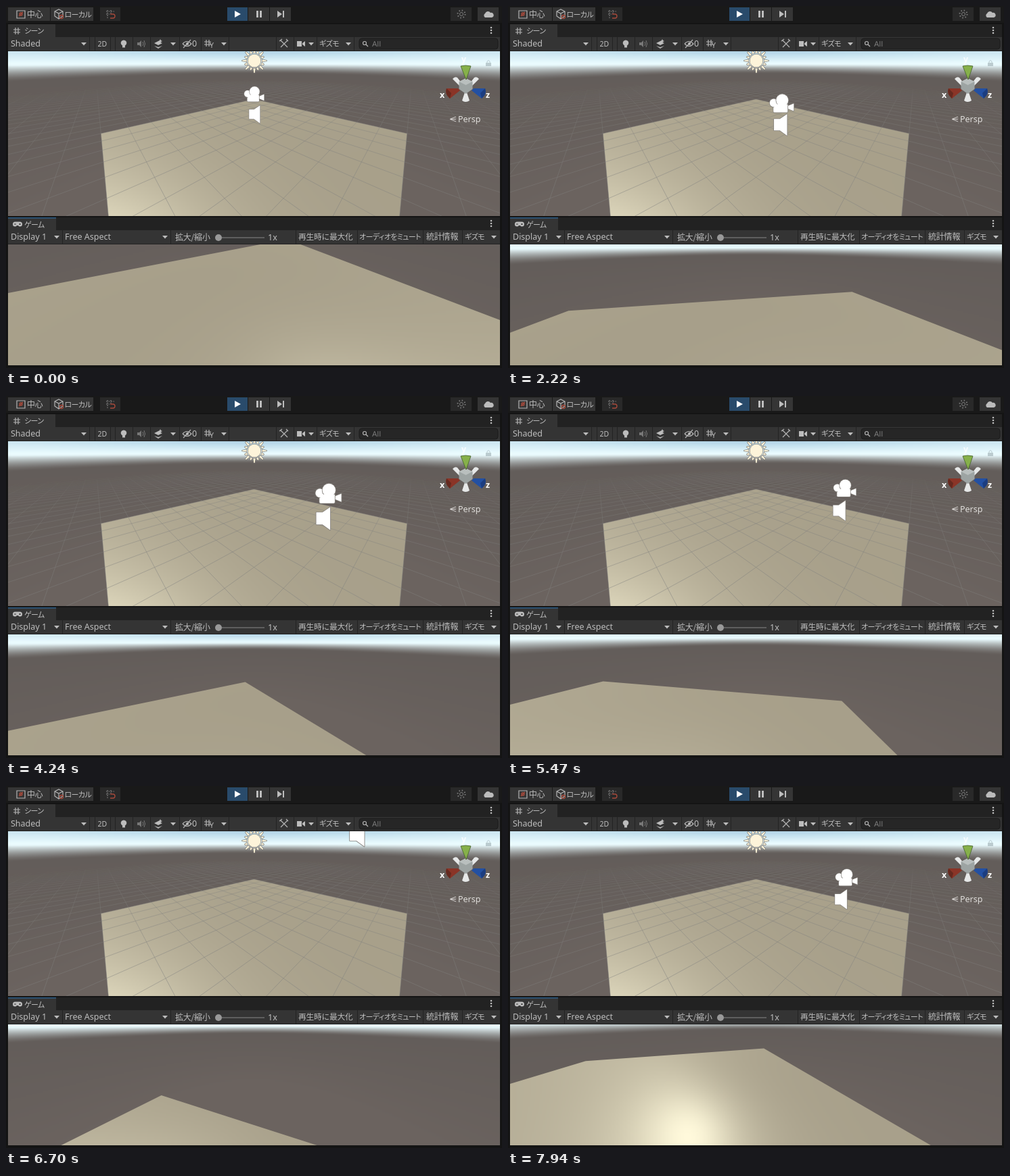
Recreate the animation shown at these times as an HTML page with a canvas. Size 733x536 px, loop 8 s.

```html
<!DOCTYPE html>
<html lang="ja">
<head>
<meta charset="utf-8">
<title>Editor view</title>
<style>
html, body { margin: 0; width: 100%; height: 100%; overflow: hidden; background: #141414; }
canvas, svg { position: absolute; left: 0; top: 0; }
canvas { left: 3px; }
#scene { top: 67px; }
#game { top: 353px; }
text { font: 12.5px "Noto Sans", "Noto Sans CJK JP", sans-serif; fill: #bdbdbd; }
.kanji { font: 12px "Noto Sans CJK JP", "Noto Sans CJK", sans-serif; letter-spacing: -.2px; }
.kana { font: 11px "Noto Sans CJK JP", "Noto Sans CJK", sans-serif; font-feature-settings: "palt"; letter-spacing: -.6px; }
.axis { font-weight: bold; fill: #fff; }
.line { fill: none; stroke: #b4b4b4; stroke-width: 1.2; }
.solid { fill: #bdbdbd; }
.icon { fill: #fff; stroke: #85817c; stroke-width: 1.6; paint-order: stroke; stroke-linejoin: round; }
.sun { fill: #fdf4da; stroke: #77746e; stroke-width: 1.2; paint-order: stroke; }
</style>
</head>
<body>
<canvas id="scene" width="727" height="244"></canvas>
<canvas id="game" width="727" height="179"></canvas>
<svg width="733" height="536" viewBox="0 0 733 536">
  <defs>
    <path id="down" class="solid" d="M-4-2h8l-4 4.5z"/>
    <g id="dots" class="solid"><circle cy="-4" r="1.3"/><circle r="1.3"/><circle cy="4" r="1.3"/></g>
    <path id="hash" class="line" d="M-2-5v10M2-5v10M-5-2h10M-5 2h10"/>
    <clipPath id="sceneClip"><path d="M3 67h727v244H3z"/></clipPath>
  </defs>

  <!-- Main toolbar -->
  <path fill="#191919" d="M0 0h733v25H0z"/>
  <path fill="#353535" d="M3 2h62v20H3zM66 2h63v20H66zM358 2h31v20h-31zM390 2h31v20h-31zM697 2h31v20h-31z"/>
  <path fill="#292929" d="M139 2h30v20h-30zM657 2h31v20h-31z"/>
  <path fill="#294b6b" d="M327 2h30v20h-30z"/>
  <path fill="#fff" d="M338 7v10l9-5z"/>
  <path class="solid" d="M370 7h3v10h-3zM375 7h3v10h-3zM401 7v10l7-5zM409 7h2v10h-2z"/>
  <path class="line" d="M16 7h12v11H16zM72 8l6-3 6 3v7l-6 4-6-4zl6 3 6-3M78 11v8"/>
  <g fill="none" stroke="#a84a3b" stroke-width="1.3">
    <path d="M19 15l6-6"/><circle cx="22" cy="12" r="2"/><circle cx="82" cy="16" r="2.5"/>
    <path d="M154 12h4a3 3 0 0 1 0 6h-4"/>
  </g>
  <path class="line" stroke-dasharray="2 1.5" opacity=".6" d="M148 8h12M148 12h5M150 6v12M155 6v5"/>
  <g fill="none" stroke="#7c7c7c"><circle cx="673" cy="12" r="2.5"/><circle cx="673" cy="12" r="5.5" stroke-width="2" stroke-dasharray="1.5 2.82"/></g>
  <path class="solid" d="M708 17a3.5 3.5 0 0 1 0-6a4.5 4.5 0 0 1 8-1a3.6 3.6 0 0 1 2 7z"/>
  <text class="kanji" x="31" y="16.5">中心</text>
  <text class="kana" x="86.5" y="16.5">ローカル</text>

  <!-- Scene panel header -->
  <path fill="#222" d="M3 27h727v19H3z"/>
  <path fill="#343434" d="M3 27h70v19H3zM3 46h727v21H3z"/>
  <use href="#hash" x="16" y="37"/>
  <text class="kana" x="27" y="41">シーン</text>
  <use href="#dots" x="717" y="36"/>
  <path stroke="#232323" d="M123.5 46v20M131.5 46v20M154.5 46v20M161.5 46v20M187.5 46v20M213.5 46v20M256.5 46v20M288.5 46v20M329.5 46v20M399.5 46v20M425.5 46v20M459.5 46v20M514.5 46v20M3 66.5h727"/>
  <text x="7" y="60">Shaded</text>
  <use href="#down" x="115" y="56"/><use href="#down" x="247" y="56"/><use href="#down" x="322" y="56"/>
  <use href="#down" x="451" y="56"/><use href="#down" x="506" y="56"/>
  <text x="135.5" y="60" style="font-size:10.5px">2D</text>
  <path class="solid" d="M172 58.500a4.300 4.300 0 1 1 4 0v3h-4z"/>
  <path fill="#777" d="M194 54h3l3-3v10l-3-3h-3z"/><path fill="none" stroke="#777" d="M202 53q2 3 0 6M204 51q3 5 0 10"/>
  <path class="solid" d="M219 55l6-3 6 3-6 3zM219 59l6 2 6-2-6 4zM228 49l1 2 2 1-2 1-1 2-1-2-2-1 2-1z"/>
  <path class="line" d="M261 56q6-7 13 0q-6 7-13 0M262 62l11-12"/><circle class="solid" cx="268" cy="56" r="2"/>
  <text x="275" y="60">0</text>
  <use href="#hash" x="298" y="55"/><text x="301" y="62" style="font-size:10.5px">Y</text>
  <path class="line" stroke-width="2.2" d="M406 51l10 10M416 51l-10 10M404 52l4-3M414 49l3 3"/>
  <path class="solid" d="M430 52h7v8h-7zM438 55l4-3v8l-4-3z"/>
  <text class="kana" x="463" y="60">ギズモ</text>
  <rect x="522" y="48" width="205" height="16" rx="4" fill="#262626" stroke="#1b1b1b"/>
  <circle class="line" cx="530" cy="55" r="2.5"/><path class="line" d="M532 57l3 3"/>
  <text x="541" y="60" style="font-size:11.5px;fill:#777">All</text>

  <!-- Game panel header -->
  <path fill="#222" d="M3 313h727v19H3z"/>
  <path fill="#343434" d="M3 313h71v19H3zM3 332h727v21H3z"/>
  <path fill="#2c5d87" d="M3 313h71v1.5H3z"/>
  <path class="solid" fill-rule="evenodd" d="M13.500 319.500h7a3.500 3.500 0 0 1 0 7q-1.500 0-2.500-1.500h-2q-1 1.500-2.500 1.500a3.500 3.500 0 0 1 0-7zM12 322.500h3v1h-3zM19.500 322h2v2h-2z"/>
  <text class="kana" x="27" y="327.5">ゲーム</text>
  <use href="#dots" x="717" y="322"/>
  <path stroke="#232323" d="M83.5 332v20M243.5 332v20M428.5 332v20M519.5 332v20M616.5 332v20M674.5 332v20M3 352.5h727"/>
  <text x="7" y="346">Display 1</text><use href="#down" x="75" y="342"/>
  <text x="87" y="346">Free Aspect</text><use href="#down" x="235" y="342"/>
  <text class="kanji" x="250" y="346.5">拡大/縮小</text>
  <path stroke="#5e5e5e" stroke-width="2" d="M319 343h63"/><circle cx="314" cy="343" r="5" fill="#999"/>
  <text x="387" y="347">1x</text>
  <text class="kanji" x="432" y="346" style="font-size:11.7px">再生時に最大化</text>
  <text class="kana" x="522" y="346">オーディオをミュート</text>
  <text class="kanji" x="621" y="346">統計情報</text>
  <text class="kana" x="678" y="346">ギズモ</text><use href="#down" x="721" y="342"/>

  <!-- Scene icons -->
  <g clip-path="url(#sceneClip)">
    <g class="sun" transform="translate(367 81)"><g id="rays"></g><circle r="9.5"/></g>
    <g id="speaker" class="icon"><path d="M-9-8.500h9L11-16V17L0 9h-9z"/></g>
    <g id="camera" class="icon">
      <path d="M8 4l10-4v11L8 7z"/><rect x="-12" y="0" width="21" height="13" rx="1.5"/>
      <circle cx="-11.5" cy="-1" r="6"/><circle cx="1" cy="-5" r="9"/>
      <path stroke="none" d="M-11 1h19v11h-19z"/>
    </g>
  </g>

  <!-- Orientation gizmo -->
  <path fill="#e6e8e8" d="M660 108q3-4 7-2l7 9-4 3zM699 108q-3-4-7-2l-7 9 4 3zM674 140q5 4 11 0l-4-12h-3z"/>
  <path fill="#8a3427" d="M651 122q-3 8 5 15l15-12-3-3z"/><path fill="#65291f" d="M651 122q-3 8 5 15l2-8z"/>
  <path fill="#2350a2" d="M708 122q3 8-5 15l-15-12 3-3z"/><path fill="#1b3d80" d="M708 122q3 8-5 15l-2-8z"/>
  <path fill="#9da4a3" d="M679.500 107l10 5v11l-10 7-10-7v-11z"/><path fill="#b9bfbe" d="M679.500 107l10 5-10 5-10-5z"/>
  <path fill="#86b04a" stroke="#45602c" stroke-width=".8" d="M672 89q7-2 15 0l-7 20z"/>
  <text class="axis" x="673" y="83" opacity=".8">y</text><text class="axis" x="641" y="136">x</text><text class="axis" x="709" y="136">z</text>
  <g opacity=".5"><path fill="#8fa0a5" d="M709 84h8v5h-8z"/><path fill="none" stroke="#8fa0a5" d="M711 84v-2q2-3 4 0v2"/></g>
  <path fill="none" stroke="#d5d2d0" d="M665 164l-9 3.500 9 3.500M656 167.500h9"/>
  <text x="668" y="172" style="fill:#e0dedc">Persp</text>
</svg>
<script>
const $ = id => document.getElementById(id);
const RAD = Math.PI / 180, LOOP = 8000, HALF = 5, EYE = 1.78, SPEAKER_HEIGHT = 0.94;
const clamp = v => Math.max(0, Math.min(1, v));
const lerp = (a, b, k) => a + (b - a) * k;
const mix = (a, b, k) => a.map((v, i) => lerp(v, b[i], k));
const ramp = (t, from, to) => clamp((t - from) / (to - from));

const GROUND_FAR = [98, 92, 89], GROUND_NEAR = [107, 99, 95], HAZE = [235, 252, 255], SKY = [165, 203, 225];
const FLOOR = [164, 156, 135], FLOOR_LIT = [255, 249, 219];

// Each move adds its change to the walker's pose over its span
const start = { p: 0, q: 0, yaw: 119.6, pitch: 46.7 };
const moves = [
  { from: 130, to: 1820, yaw: -20.7, pitch: -17.9 },
  { from: 1940, to: 2380, p: -.35, q: -2.25 },
  { from: 2930, to: 4480, q: -.54, yaw: -78.6, pitch: -2.5 },
  { from: 3890, to: 4480, p: 1.55 },
  { from: 4860, to: 5700, p: .71, yaw: -41.6, pitch: 3.2 },
  { from: 6860, to: 7940, yaw: -51.2, pitch: 1.7 }
];

function poseAt(t) {
  const pose = { ...start };
  for (const { from, to, ...change } of moves)
    for (const key in change) pose[key] += change[key] * ramp(t, from, to);
  const bob = .09 * Math.sin(Math.PI * ramp(t, 1940, 2380));
  const air = (t - 6015) / 1000, jump = Math.max(0, 10 * air - 9.81 * air * air);
  return { ...pose, height: EYE - bob + jump, jump };
}

// Yaw turns clockwise from the p axis; a positive pitch looks down
function makeCamera({ p, q, height, yaw, pitch }) {
  yaw *= RAD; pitch *= RAD;
  return { p, q, height, cy: Math.cos(yaw), sy: Math.sin(yaw), cp: Math.cos(pitch), sp: Math.sin(pitch) };
}

function toView(cam, [p, q, height]) {
  const dp = p - cam.p, dq = q - cam.q, dh = height - cam.height;
  const forward = dp * cam.cy - dq * cam.sy;
  return [-dp * cam.sy - dq * cam.cy, forward * cam.sp + dh * cam.cp, forward * cam.cp - dh * cam.sp];
}

function makeView(canvas) {
  const { width, height } = canvas, buffer = document.createElement('canvas');
  buffer.width = Math.ceil(width / 2);
  buffer.height = Math.ceil(height / 2);
  const bufferCtx = buffer.getContext('2d');
  return { ctx: canvas.getContext('2d'), width, height, buffer, bufferCtx,
    focal: height / 2 / Math.tan(30 * RAD), image: bufferCtx.createImageData(buffer.width, buffer.height) };
}

const toScreen = (view, [x, y, z]) => [view.width / 2 + view.focal * x / z, view.height / 2 - view.focal * y / z];

// Fills the view with color(forward, up, right) at half resolution
function fillRays(view, cam, color) {
  const { buffer, image, focal } = view;
  let i = 0;
  for (let row = 0; row < buffer.height; row++) {
    const y = (view.height / 2 - row * 2 - 1) / focal;
    const forward = cam.cp + y * cam.sp, up = y * cam.cp - cam.sp;
    for (let col = 0; col < buffer.width; col++) {
      const right = (col * 2 + 1 - view.width / 2) / focal, len = Math.hypot(forward, up, right);
      const c = color(forward / len, up / len, right / len);
      for (let n = 0; n < 3; n++) image.data[i++] = c[n];
      image.data[i++] = 255;
    }
  }
  view.bufferCtx.putImageData(image, 0, 0);
  view.ctx.drawImage(buffer, 0, 0, buffer.width * 2, buffer.height * 2);
}

function skyColor(forward, up) {
  const elevation = Math.asin(up) / RAD;
  if (elevation > 0) return mix(HAZE, SKY, clamp(elevation / 4.5));
  const ground = mix(GROUND_FAR, GROUND_NEAR, clamp(-elevation / 28));
  return mix(ground, HAZE, clamp((elevation + 3.3) / 3) ** 1.5);
}

// Sunlight reflected by the floor, by the tilt of the half vector
const sun = { yaw: -120 * RAD, up: Math.sin(47 * RAD), level: Math.cos(47 * RAD) };
const floorColor = cam => {
  const sunP = sun.level * Math.cos(sun.yaw), sunQ = -sun.level * Math.sin(sun.yaw);
  return (forward, up, right) => {
    const halfP = sunP - forward * cam.cy + right * cam.sy, halfQ = sunQ + forward * cam.sy + right * cam.cy;
    const tilt = Math.atan2(Math.hypot(halfP, halfQ), sun.up - up) / RAD;
    const grazing = .12 * (1 + Math.min(up, 0)) ** 4;
    return mix(FLOOR, FLOOR_LIT, Math.min(1, grazing + (1 + (tilt / 16) ** 2) ** -1.5));
  };
};

function clipNear(points, near = .02) {
  return points.flatMap((a, i) => {
    const b = points[(i + 1) % points.length], out = a[2] > near ? [a] : [];
    if ((a[2] > near) !== (b[2] > near)) out.push(mix(a, b, (near - a[2]) / (b[2] - a[2])));
    return out;
  });
}

function drawWorld(view, cam) {
  const { ctx } = view;
  fillRays(view, cam, skyColor);
  const corners = [[-HALF, -HALF, 0], [HALF, -HALF, 0], [HALF, HALF, 0], [-HALF, HALF, 0]];
  ctx.save();
  ctx.beginPath();
  clipNear(corners.map(c => toView(cam, c))).forEach(v => ctx.lineTo(...toScreen(view, v)));
  ctx.clip();
  fillRays(view, cam, floorColor(cam));
  ctx.restore();
}

function drawGrid(view, cam) {
  const { ctx } = view, reach = 30;
  const segment = (a, b) => {
    const va = toView(cam, a), vb = toView(cam, b);
    const alpha = .55 * (1 - Math.hypot(a[0] - cam.p, a[1] - cam.q) / reach);
    if (va[2] < .1 || vb[2] < .1 || alpha <= 0) return;
    ctx.strokeStyle = `rgba(128,128,126,${alpha})`;
    ctx.beginPath();
    ctx.moveTo(...toScreen(view, va));
    ctx.lineTo(...toScreen(view, vb));
    ctx.stroke();
  };
  for (let i = -reach; i <= reach; i++)
    for (let j = -reach; j < reach; j++) {
      segment([i, j, 0], [i, j + 1, 0]);
      segment([j, i, 0], [j + 1, i, 0]);
    }
}

const sceneView = makeView($('scene')), gameView = makeView($('game'));
const sceneCam = makeCamera({ p: -4.193, q: -4.193, height: 2.913, yaw: -45, pitch: 26.2 });
drawWorld(sceneView, sceneCam);
drawGrid(sceneView, sceneCam);

for (let i = 0; i < 16; i++)
  $('rays').innerHTML += `<path d="M-1.6-11.5h3.2L.6-${i % 2 ? 15 : 18}h-1.2z" transform="rotate(${i * 22.5})"/>`;

function placeIcon(id, position, unitDepth) {
  const v = toView(sceneCam, position), [x, y] = toScreen(sceneView, v);
  $(id).setAttribute('transform', `translate(${x + 3} ${y + 67}) scale(${unitDepth / v[2]})`);
}

function frame(now) {
  const pose = poseAt(now % LOOP), { p, q, height, jump } = pose;
  drawWorld(gameView, makeCamera(pose));
  placeIcon('camera', [p, q, height], 4.8);
  placeIcon('speaker', [p, q, SPEAKER_HEIGHT + jump], 4.98);
  requestAnimationFrame(frame);
}
requestAnimationFrame(frame);
</script>
</body>
</html>
```
